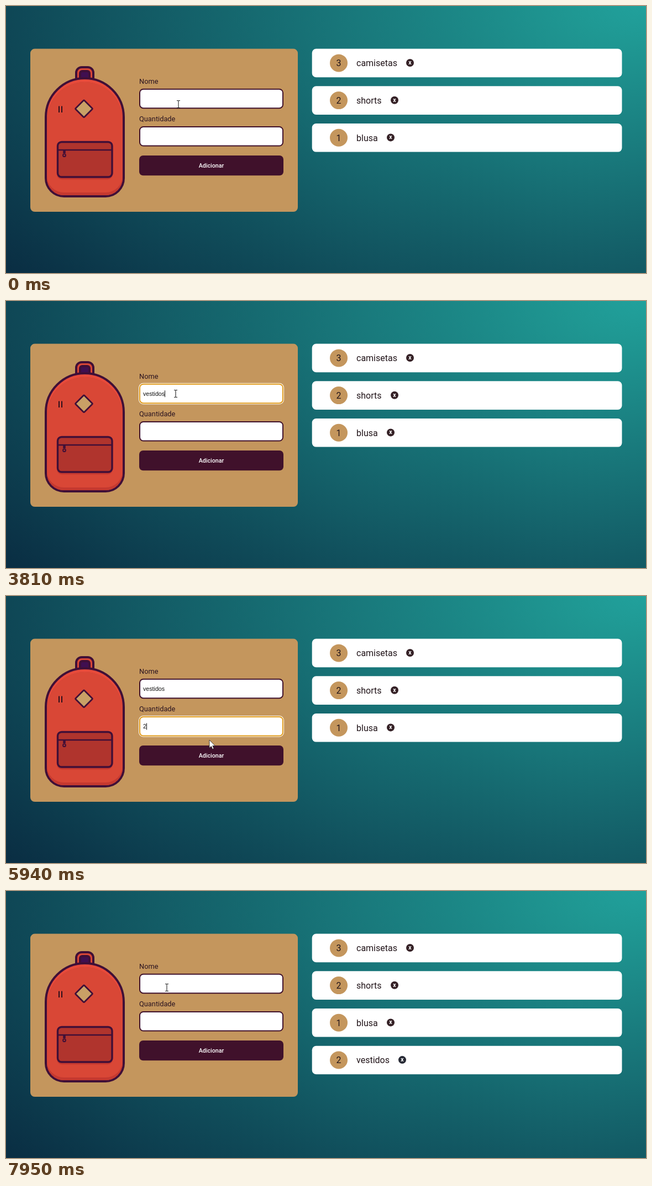
Recreate the animation shown at these times as an HTML page. Size 1158 by 484 pixels, loop 8000 ms.

```html
<!DOCTYPE html>
<html lang="pt">
<head>
<meta charset="utf-8">
<title>Mochila</title>
<style>
html, body { margin: 0; width: 1158px; height: 484px; overflow: hidden; }
body { background: radial-gradient(1600px 840px at 100% 0, #21a19c 0%, #1f9893 8%, #092a40 95%, #08263b 100%); }
svg { display: block; }
text { font-family: Roboto, sans-serif; fill: #211419; }
.label { font-size: 12.8px; fill: #2a1320; }
.item { font-size: 16px; }
.typed { font: 10.67px "Liberation Sans", Arial, sans-serif; fill: #111; }
.add { font-size: 10.67px; font-weight: 500; fill: #fff; text-anchor: middle; }
</style>
</head>
<body>
<svg width="1158" height="484" viewBox="0 0 1158 484">
  <rect x="44" y="77.6" width="484" height="295.4" rx="8" fill="#c4965d"/>

  <g id="bag" stroke="#400f37" stroke-width="4" stroke-linejoin="round">
    <path d="M127 136V121a10 10 0 0 1 10-10h11a10 10 0 0 1 10 10v15z" fill="#d94736"/>
    <path d="M134 134v-12a4 4 0 0 1 4-4h9a4 4 0 0 1 4 4v12z" fill="#400f50"/>
    <path id="body" d="M72 201.500a70.500 70.500 0 0 1 141 0V312a33 33 0 0 1-33 33H105a33 33 0 0 1-33-33z" fill="#e74b3b"/>
    <g stroke="none">
      <path d="M74 208a68.500 70 0 0 1 137 0V312a31 31 0 0 1-31 31H105a31 31 0 0 1-31-31z" fill="#c5392f"/>
      <path d="M74 208a68.500 70 0 0 1 137 0V308a31 30 0 0 1-31 30H105a31 30 0 0 1-31-30z" fill="#d94736"/>
      <rect x="92" y="249" width="101" height="65.500" rx="9" fill="#c5392f"/>
    </g>
    <rect x="93.500" y="246.500" width="98.500" height="63.500" rx="7" fill="#b0342d" stroke-width="3.400"/>
    <path d="M94 261H192" stroke-width="2.600"/>
    <path d="M105.500 262v5" stroke-width="4.500"/>
    <circle cx="105.500" cy="270.700" r="2.400" fill="#b0342d" stroke-width="2"/>
    <rect x="-11.200" y="-11.200" width="22.400" height="22.400" rx="1.500" transform="translate(141 186.300) rotate(45)" fill="#c9a066" stroke-width="2.800"/>
    <path d="M96 181.500v11.500M101 181.500v11.500" stroke="#2c0f1c" stroke-width="2"/>
  </g>

  <text class="label" x="241" y="141">Nome</text>
  <text class="label" x="241" y="209">Quantidade</text>
  <g id="fields"></g>
  <rect x="241" y="271" width="261" height="36.300" rx="7" fill="#40112b"/>
  <text class="add" x="371.500" y="293">Adicionar</text>
  <g id="list"></g>

  <circle id="click" r="10" fill="#e5d800" opacity=".55"/>
  <g id="cursor">
    <path d="M-3-6.500H-1L0-6 1-6.500H3M0-6V6M-3 6.500H-1L0 6 1 6.500H3" fill="none" stroke="#222" stroke-width="1.100"/>
    <path d="M0 0V14.500L3.400 11.400 5.700 16.600 8 15.600 5.800 10.600H10.400z" fill="#fff" stroke="#222" stroke-width=".8"/>
    <path d="M-.5 1.500q1.500-1.800 3 0V6.500l5 1.200q1.400.5 1.400 2V13l-1.700 5.500H-.3L-4 12q-.7-2 1.200-2L-.5 11.500z" fill="#fff" stroke="#222" stroke-width=".8"/>
  </g>
</svg>
<script>
const LOOP = 8000, STEP = 68;
const $ = id => document.getElementById(id);
const show = (el, on) => el.setAttribute('display', on ? 'inline' : 'none');

function add(parent, tag, attrs, text = '') {
  const el = document.createElementNS('http://www.w3.org/2000/svg', tag);
  for (const k in attrs) el.setAttribute(k, attrs[k]);
  el.textContent = text;
  parent.append(el);
  return el;
}

function makeField(y) {
  const g = $('fields');
  const ring = add(g, 'rect', { x: 240, y: y - 1, width: 263, height: 38.5, rx: 8.5, fill: '#fff' });
  const box = add(g, 'rect', { x: 242, y: y + 1, width: 259, height: 34.5, rx: 6.5, fill: '#fff', 'stroke-width': 2 });
  const text = add(g, 'text', { class: 'typed', x: 248, y: y + 22 });
  const caret = add(g, 'rect', { y: y + 12.5, width: 1, height: 12, fill: '#111' });
  return { ring, box, text, caret };
}

function makeItem(count, name, right, row) {
  const y = 77.6 + row * 67.7, mid = y + 25.8;
  const g = add($('list'), 'g', {});
  add(g, 'rect', { x: 553.7, y, width: 560.8, height: 51.6, rx: 7.5, fill: '#fff' });
  add(g, 'circle', { cx: 602, cy: mid, r: 16, fill: '#c4965d' });
  add(g, 'text', { class: 'item', x: 602, y: mid + 5.7, 'text-anchor': 'middle' }, count);
  add(g, 'text', { class: 'item', x: 634, y: mid + 5.7 }, name);
  add(g, 'circle', { cx: right + 23, cy: mid - .4, r: 7, fill: row < 3 ? '#352126' : '#272a35' });
  add(g, 'text', { x: right + 23, y: mid + 2.6, 'text-anchor': 'middle',
    style: 'font-size:10.5px;font-weight:700;fill:#fff' }, 'x');
  return g;
}

const nameField = makeField(149.7), countField = makeField(218);
[[3, 'camisetas', 708], [2, 'shorts', 680], [1, 'blusa', 673]].forEach((r, i) => makeItem(...r, i));
const added = makeItem(2, 'vestidos', 694, 3);

const nameKeys = [[0, ''], [1270, 'v'], [1400, 've'], [1540, 'ves'], [1800, 'vest'], [1870, 'vesti'],
  [2140, 'vestifd'], [2540, 'vestifdo'], [2870, 'vestifd'], [3070, 'vestif'], [3270, 'vesti'],
  [3540, 'vestid'], [3670, 'vestido'], [3810, 'vestidos'], [6550, '']];
const countKeys = [[0, ''], [5660, '2'], [6550, '']];

// start time, number of steps, end point
const moves = [[70, 3, 307, 168], [4360, 7, 384, 262], [4838, 1, 385, 273], [4975, 2, 373, 242],
  [5460, 1, 368, 255], [5930, 5, 366, 287], [7540, 7, 291, 175]];
// start, end, centre
const clicks = [[270, 410, 306, 167], [5120, 5260, 372, 241], [6400, 6550, 366, 287]];

function drawField(f, keys, t, from, to) {
  const [at, value] = keys.filter(k => k[0] <= t).pop();
  const focus = t >= from && t < to;
  const blink = (t - Math.max(at, from + 40)) % 1000 < 500;
  f.text.textContent = value;
  show(f.ring, focus);
  f.box.setAttribute('stroke', focus ? '#e09a1a' : '#40112b');
  f.caret.setAttribute('x', Math.round(248 + (value ? f.text.getComputedTextLength() : 0)));
  show(f.caret, focus && blink);
}

function pointer(t) {
  let x = 312, y = 178;
  for (const [start, n, tx, ty] of moves) {
    if (t < start) break;
    const p = Math.min(1, (Math.floor((t - start) / STEP) + 1) / n);
    x += (tx - x) * p;
    y += (ty - y) * p;
  }
  return [Math.round(x), Math.round(y)];
}

function cursorKind(x, y) {
  if (x < 241 || x > 502) return 1;
  if (y >= 271 && y <= 307) return 2;
  return (y >= 150 && y <= 186) || (y >= 218 && y <= 254) ? 0 : 1;
}

function draw(t) {
  drawField(nameField, nameKeys, t, 270, 5120);
  drawField(countField, countKeys, t, 5120, 6400);
  show(added, t >= 6550);

  const [x, y] = pointer(t), kind = cursorKind(x, y);
  $('cursor').setAttribute('transform', `translate(${x} ${y})`);
  [...$('cursor').children].forEach((c, i) => show(c, i === kind));

  const hit = clicks.find(c => t >= c[0] && t < c[1]);
  show($('click'), hit);
  if (hit) {
    $('click').setAttribute('cx', hit[2]);
    $('click').setAttribute('cy', hit[3]);
  }
}

function tick() {
  draw(performance.now() % LOOP);
  requestAnimationFrame(tick);
}
tick();
</script>
</body>
</html>
```
